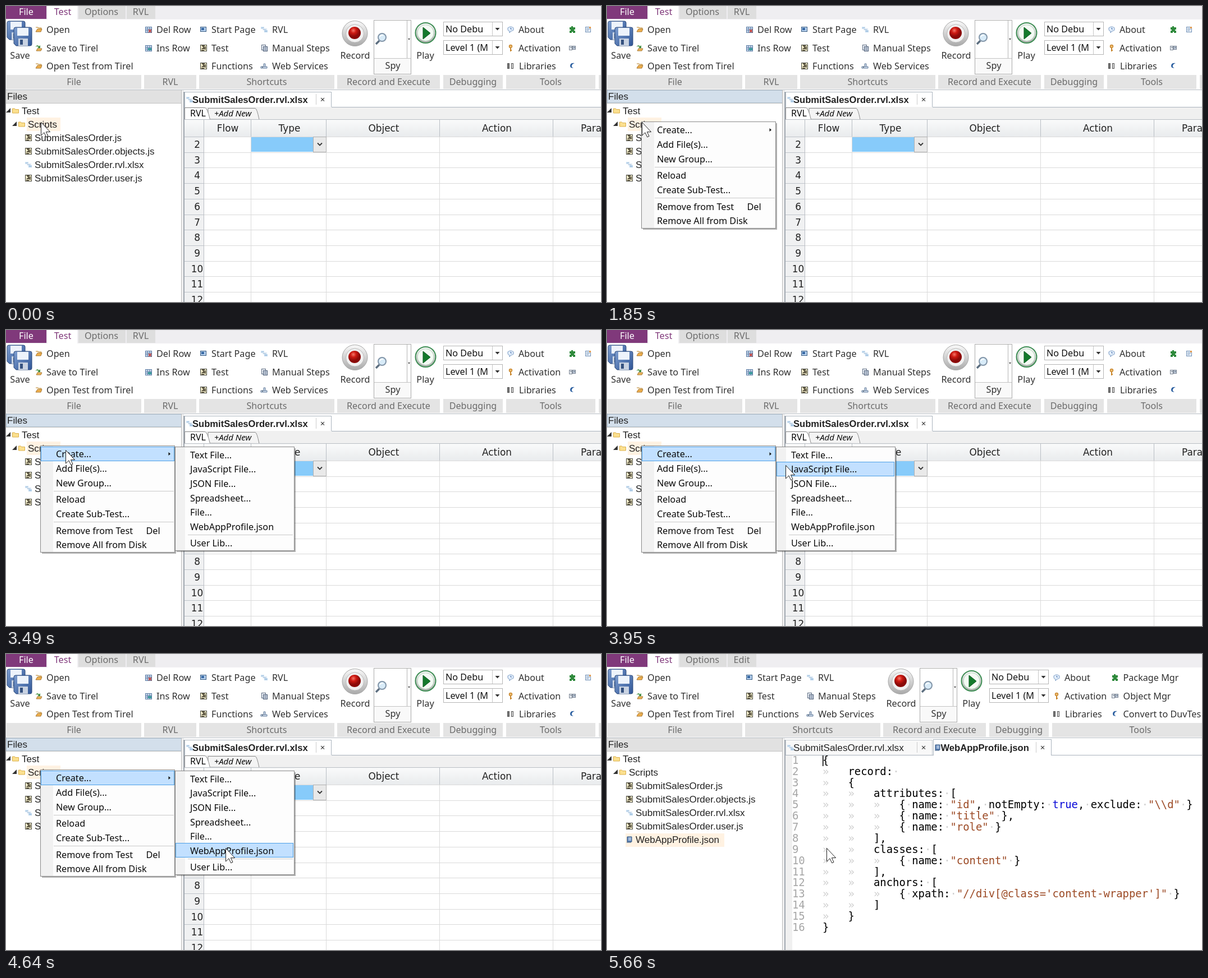
An HTML page that plays this animation: 1060x528 px, repeating every 7.66 s.

```html
<!DOCTYPE html>
<html lang="en">
<head>
<meta charset="utf-8">
<title>Creating a profile file</title>
<style>
html, body { margin: 0; width: 100%; height: 100%; overflow: hidden; background: #fff; }
svg { display: block; width: 100%; height: 100%; }
text { white-space: pre; }
.ui { font: 16.2px "Noto Sans", "Open Sans", sans-serif; fill: #303030; }
.menu { font: 16.2px "Noto Sans", "Open Sans", sans-serif; fill: #0a0a0a; }
.label { font: 16.1px "Noto Sans", "Open Sans", sans-serif; fill: #6b6b6b; }
.tree { font: 17px "Liberation Sans", Arial, sans-serif; fill: #222; }
.tab { font: 17.2px "Liberation Sans", Arial, sans-serif; fill: #222; }
.bold { font: bold 16.6px "Liberation Sans", Arial, sans-serif; fill: #222; }
.grid { font: 16.9px "DejaVu Sans", Verdana, sans-serif; fill: #222; }
.add { font: italic 15px "Open Sans", sans-serif; fill: #000; }
.code { font: 18.9px "DejaVu Sans Mono", monospace; fill: #000; }
.num { fill: #a6a6a6; }
.mark { fill: #cfcfcf; }
.str { fill: #9c4a25; }
.key { fill: #0a0ad8; }
.mid { text-anchor: middle; }
</style>
</head>
<body>
<svg id="stage" viewBox="0 0 1060 528" xmlns="http://www.w3.org/2000/svg"></svg>
<script>
const rect = (x, y, w, h, fill, stroke) => stroke
  ? `<rect x="${x + .5}" y="${y + .5}" width="${w - 1}" height="${h - 1}" fill="${fill}" stroke="${stroke}"/>`
  : `<rect x="${x}" y="${y}" width="${w}" height="${h}" fill="${fill}"/>`;
const path = (d, fill, stroke = 'none', width = 1) =>
  `<path d="${d}" fill="${fill}" stroke="${stroke}" stroke-width="${width}"/>`;
const circle = (x, y, r, fill, stroke = 'none', width = 1) =>
  `<circle cx="${x}" cy="${y}" r="${r}" fill="${fill}" stroke="${stroke}" stroke-width="${width}"/>`;
// y is the vertical middle of the capitals
const text = (x, y, s, cls = 'ui', style = '') =>
  `<text x="${x}" y="${y + 6}" class="${cls}" style="${style}">${s}</text>`;
const group = (id, body) => `<g id="${id}">${body}</g>`;
const shift = (dx, body) => `<g transform="translate(${dx})">${body}</g>`;
const at = (x, y, body) => `<g transform="translate(${x} ${y})">${body}</g>`;

// Small icons, centred on their own origin
const icon = {
  folder: path('M-5.500-4h4l1 1.500h6v6.500h-11z', '#fbe08f', '#dcb04c'),
  open: path('M-5-4h4l1 1h5v3', '#f6d58c', '#b98a45') + path('M-5 4l3-5h8l-2 5z', '#f0b04c', '#a87835'),
  saveTo: path('M-4 5l2-4h8l-2 4z', '#edb65a', '#a87835') + path('M-6-2q4-5 7-1l2-2v5h-5l2-2q-3-2-6 0z', '#3c8a3c'),
  js: rect(-6, -6, 12, 12, '#f2eccb', '#4a4a42') + path('M2-4h-4l3 3-3 2h4M-4 4h5M3-3v6', 'none', '#3b3525', 1.5),
  sheet: rect(-6, -5, 6, 4, '#cfe2f3') + rect(-3, -2, 8, 3, '#dfeaf5') + rect(0, 1, 6, 4, '#bdd7ee')
    + path('M-5-3h4M1 3h4M-2 0h5', 'none', '#9dbbd8'),
  delRow: rect(-6, -5, 12, 11, '#dce8f7', '#53759f') + path('M-6-1h12M-6 2h12M-2-5v11M2-5v11', 'none', '#53759f') + path('M0 0l5 5M5 0l-5 5', 'none', '#d03b30', 1.6),
  insRow: rect(-6, -5, 12, 11, '#dce8f7', '#53759f') + path('M-6-1h12M-6 2h12M-2-5v11M2-5v11', 'none', '#53759f') + rect(-1, 0, 6, 4, '#3a9b9b'),
  page: rect(-6, -5, 11, 9, '#b8d2ef', '#34587f') + rect(-4, -3, 5, 4, '#3768a4'),
  steps: rect(-5, -6, 8, 10, '#eef2f8', '#5b6a80') + rect(-2, -3, 8, 9, '#d5deeb', '#42536d') + path('M0 0h4M0 3h4', 'none', '#42536d'),
  web: path('M-6 4h11v-3h-11zM-1 1v-5h3v5', '#cfdcec', '#637a99') + circle(-3, 2, 1, '#456'),
  help: path('M-5-3q5-4 10 0v4q-3 2-5 2l-2 3v-3q-3-1-3-3z', '#e4effc', '#7b9cc4') + path('M-1-2h2v2', 'none', '#3b67a5'),
  key: circle(0, -3, 2.5, '#f3c276', '#c98932', 1.5) + path('M0 0v6M0 4h2', 'none', '#c98932', 2),
  books: rect(-6, -5, 4, 10, '#777', '#555') + rect(1, -5, 4, 10, '#ddd', '#555'),
  puzzle: path('M-5-4h3v-2h3v2h4v4h-2v2h2v4h-4v-2h-2v2h-4v-4h2v-2h-2z', '#2f8a3c'),
  cards: rect(-6, -4, 6, 8, '#e5e9ef', '#7d8795') + rect(0, -4, 6, 7, '#bdc8d8', '#7d8795') + path('M-4-1h3M2-1h3', 'none', '#567'),
  moon: path('M4-5q-8-1-8 5 1 5 6 3-4 0-3-4 1-3 5-4z', '#2b5fa0'),
  doc: rect(-5, -5, 10, 10, '#edf3fa', '#6f8fb5') + path('M-3-2h6M-3 0h6M-3 2h4', 'none', '#89a5c6') + rect(2, -5, 3, 3, '#e39a4c'),
  json: path('M-4-5h8v9h-8z', '#5d83b8', '#315480') + path('M-2-3h5M-2-1h5M-2 1h5', 'none', '#e9f1fb') + path('M-5 5h8', 'none', '#315480'),
};
const put = (name, x, y) => at(x, y, icon[name]);
const item = (name, x, y, tx, s, cls) => put(name, x, y) + text(tx, y, s, cls);
const down = (x, y) => path(`M${x - 4} ${y - 2}h8l-4 4.5z`, '#333');

const floppy = (x, y) => at(x, y,
  path('M0 3q0-3 3-3h26q3 0 3 3v27q0 3-3 3h-25l-4-4z', 'url(#blue)', '#2b4878')
  + rect(6, 1, 20, 14, '#edf3fb') + rect(8, 20, 17, 13, '#c9d3e2') + rect(11, 22, 5, 9, '#36527f'));

const bar = (x, w, s, mid = x + w / 2) => rect(x, 123, w, 25, '#e4e4e4') + text(mid, 135, s, 'label mid');
const combo = (y, s) => rect(779, y, 106, 26, '#fff', '#b5b5b5') + rect(866, y + 1, 1, 24, '#c6c6c6')
  + text(783, y + 12.5, s, 'ui', 'fill:#111') + down(875.5, y + 13);

const fileGroup = floppy(2, 27) + floppy(14, 38) + text(25, 88, 'Save', 'ui mid')
  + item('open', 58, 42, 72, 'Open') + item('saveTo', 58, 75, 72, 'Save to Tirel')
  + item('open', 58, 107, 72, 'Open Test from Tirel') + bar(1, 240, 'File');

const rowGroup = item('delRow', 254, 42, 268, 'Del Row') + item('insRow', 254, 75, 268, 'Ins Row') + bar(246, 93, 'RVL');

const magnifier = path('M665 62l-6 6', 'none', '#5d6f80', 3.5) + circle(670, 56, 7, '#d8ebf8', '#8295a8', 2)
  + path('M666 55q2-4 6-3', 'none', '#fff', 1.5);

const mainGroups = item('page', 352, 42, 366, 'Start Page') + item('js', 352, 75, 366, 'Test')
  + item('js', 352, 107, 366, 'Functions') + item('sheet', 460, 42, 474, 'RVL')
  + item('steps', 460, 75, 474, 'Manual Steps') + item('web', 460, 107, 474, 'Web Services')
  + bar(344, 241, 'Shortcuts')
  + circle(621.5, 49, 22.5, 'url(#ring)', '#a6a6a6') + circle(621.5, 49, 16, '#f1f1f1', '#bbb')
  + circle(621, 48, 11, 'url(#red)') + text(622, 88, 'Record', 'ui mid')
  + rect(655, 25, 67, 97, '#fff', '#ababab') + rect(656, 93, 65, 28, '#f9f9f9') + rect(656, 93, 65, 1, '#c4c4c4')
  + rect(714, 26, 1, 67, '#b5b5b5') + path('M716 58h4l-2 2.500z', '#333') + magnifier + text(689, 106, 'Spy', 'ui mid')
  + circle(747.5, 48, 18, 'url(#ring)', '#3f8f55', 2) + circle(747.5, 48, 14.5, '#f4faf4', '#b9d5bf')
  + path('M743 38v21l13-10.500z', '#147a2c', '#0c5b1e') + text(747, 88, 'Play', 'ui mid')
  + bar(590, 183, 'Record and Execute')
  + combo(28, 'No Debu') + combo(61, 'Level 1 (M') + bar(779, 106, 'Debugging')
  + item('help', 899, 42, 913, 'About') + item('key', 899, 75, 913, 'Activation') + item('books', 899, 107, 914, 'Libraries');

const toolIcons = put('puzzle', 1009, 42) + put('cards', 1009, 75) + put('moon', 1009, 107);

const topTabs = rect(0, 0, 1060, 24, '#efeef1') + rect(0, 0, 72, 23, '#80397b') + rect(74, 0, 53, 24, '#fff')
  + rect(129, 0, 84, 23, '#dedede') + rect(215, 0, 51, 23, '#dedede')
  + text(36, 10, 'File', 'ui mid', 'fill:#fff') + text(101, 10, 'Test', 'ui mid', 'fill:#80397b')
  + text(170, 10, 'Options', 'ui mid', 'fill:#6c6c6c');

const files = ['js', 'objects.js', 'rvl.xlsx', 'user.js'];
const tree = path('M0 190h8v-8z', '#333') + item('folder', 17, 187, 28, 'Test', 'tree')
  + path('M11 214h8v-8z', '#333') + item('folder', 28, 211, 39, 'Scripts', 'tree')
  + files.map((f, i) => item(f === 'rvl.xlsx' ? 'sheet' : 'js', 40, 235 + 24 * i, 51, 'SubmitSalesOrder.' + f, 'tree')).join('');

const close = x => text(x, 166, '×', 'ui mid', 'font-size:15px');
const ROW = 27.7, columns = [353, 437, 571, 773, 975];
let sheetView = rect(318, 153, 262, 29, '#fff', '#a9b3bd') + rect(319, 180, 741, 23, '#f0f0f0')
  + rect(580, 180, 480, 1, '#a9b3bd') + put('sheet', 327, 167) + text(332, 167, 'SubmitSalesOrder.rvl.xlsx', 'bold')
  + rect(552, 157, 1, 19, '#ccc') + close(564)
  + path('M360 202V182.500h84q3 0 7 20z', '#f4f4f4', '#8c8c8c') + path('M318.500 203V181.500h36q4 0 9 21z', '#fff', '#8c8c8c')
  + text(328, 191, 'RVL', 'menu', 'font-size:16px') + text(371, 191, '+Add New', 'add')
  + rect(318, 202, 742, 31, 'url(#head)') + rect(318, 202, 742, 1, '#b9bec4') + rect(318, 233, 35, 295, '#f0f1f2');
for (let i = 0; i < 11; i++) {
  const y = Math.round(233 + i * ROW);
  sheetView += rect(318, y, 742, 1, '#dadada') + rect(318, y, 35, 1, '#bfc4ca')
    + text(340.5, y + 13.5, i + 2, 'grid mid');
}
sheetView += columns.map((x, i) => rect(x - 1, 203, 1, 325, i ? '#dadada' : '#b9bec4') + rect(x - 1, 203, 1, 30, '#b9bec4')).join('')
  + [[395, 'Flow'], [505, 'Type'], [673, 'Object'], [874.5, 'Action']].map(([x, s]) => text(x, 217.5, s, 'grid mid')).join('')
  + text(1024, 217.5, 'Params', 'grid') + rect(437, 234, 111, 26, '#87cbfa')
  + rect(547, 233, 24, 28, '#e9e9e9', '#b0b0b0') + path('M555 244.500l4 4 4-4', 'none', '#333', 1.8);

const source = [[0, '{'], [1, 'record: '], [1, '{'], [2, 'attributes: ['],
  [3, String.raw`{ name: "id", notEmpty: true, exclude: "\\d" }`], [3, '{ name: "title" },'], [3, '{ name: "role" }'],
  [2, '],'], [2, 'classes: ['], [3, '{ name: "content" }'], [2, '],'], [2, 'anchors: ['],
  [3, `{ xpath: "//div[@class='content-wrapper']" }`], [2, ']'], [1, '}'], [0, '}']];
const span = (cls, s) => `<tspan class="${cls}">${s}</tspan>`;
const paint = s => s.replace(/"[^"]*"|true| /g, m =>
  m === ' ' ? span('mark', '·') : span(m === 'true' ? 'key' : 'str', m));
const editorView = rect(318, 153, 262, 28, '#f8f8f8', '#c3c9cf') + put('sheet', 327, 167)
  + text(332, 167, 'SubmitSalesOrder.rvl.xlsx', 'tab') + rect(552, 157, 1, 19, '#ccc') + close(564)
  + rect(318, 180, 742, 1, '#a9b3bd') + rect(581, 152, 211, 29, '#fff', '#a9b3bd') + rect(582, 180, 209, 1, '#fff')
  + put('json', 589, 167) + text(594.5, 167, 'WebAppProfile.json', 'bold') + rect(764, 157, 1, 19, '#ccc') + close(776)
  + rect(318, 181, 12, 347, '#f0f0f0')
  + source.map(([depth, s], i) => {
    const y = 189.8 + 19.87 * i;
    return text(330, y, i + 1, 'code num') + text(384, y, span('mark', '»   ').repeat(depth) + paint(s), 'code');
  }).join('') + rect(384, 181, 1.5, 19, '#000');

const popup = (x, y, w, h, gutter) => rect(x + 3, y + 3, w - 1, h - 1, 'rgba(0,0,0,.3)') + rect(x, y, w, h, '#fdfdfd', '#8a8a8a')
  + rect(x + 1, y + 1, gutter, h - 2, '#f1f1f1');
const glow = (id, x, y, w) => `<g id="${id}">${rect(x, y, w, 26, '#c2e0ff', '#4b9fe6')}</g>`;
const menuRows = [[221, 'Create...'], [247, 'Add File(s)...'], [272.5, 'New Group...'], [302, 'Reload'],
  [328, 'Create Sub-Test...'], [357.5, 'Remove from Test'], [383, 'Remove All from Disk']];
const subRows = [[222.5, 'Text File...'], [248, 'JavaScript File...'], [273.5, 'JSON File...'], [299.5, 'Spreadsheet...'],
  [325, 'File...'], [350.5, 'WebAppProfile.json'], [380, 'User Lib...']];
const rows = (list, x) => list.map(([y, s]) => text(x, y, s, 'menu')).join('');

document.getElementById('stage').innerHTML = `<defs>
  <linearGradient id="blue" x2="1" y2="1"><stop stop-color="#7f9fd0"/><stop offset="1" stop-color="#2f5596"/></linearGradient>
  <linearGradient id="ring" x2="0" y2="1"><stop stop-color="#fafafa"/><stop offset="1" stop-color="#a9a9a9"/></linearGradient>
  <linearGradient id="head" x2="0" y2="1"><stop stop-color="#fafbfb"/><stop offset="1" stop-color="#e9ebed"/></linearGradient>
  <radialGradient id="red" cx=".4" cy=".3"><stop stop-color="#f4796a"/><stop offset=".45" stop-color="#cf1a12"/><stop offset="1" stop-color="#8a0a08"/></radialGradient>
</defs>`
  + rect(0, 0, 1060, 528, '#fff') + topTabs + fileGroup
  + group('before', text(240, 10, 'RVL', 'ui mid', 'fill:#6c6c6c') + rowGroup + mainGroups + toolIcons
    + put('doc', 1037, 42) + bar(891, 159, 'Tools') + rect(1056, 123, 4, 25, '#e4e4e4'))
  + group('after', text(240, 10, 'Edit', 'ui mid', 'fill:#6c6c6c') + shift(-98, mainGroups) + shift(-104, toolIcons)
    + text(919.5, 42, 'Package Mgr') + text(919.5, 75, 'Object Mgr') + text(919.5, 107, 'Convert to DuvTes')
    + bar(793, 267, 'Tools', 950))
  + rect(0, 149, 1060, 1, '#b4bac1') + rect(0, 150, 313, 23, '#e1e1e1') + group('focus', rect(0, 150, 313, 23, '#d3dfeb', '#b4c4d3'))
  + rect(0, 173, 313, 1, '#c4c4c4') + text(2, 161, 'Files', 'tree')
  + group('hover', rect(37, 199, 60, 24, '#fff2e2'))
  + group('added', rect(33, 320, 176, 24, '#fff2e2') + item('json', 40, 331, 51, 'WebAppProfile.json', 'tree'))
  + tree + rect(312, 150, 1, 378, '#bcbcbc') + rect(313, 150, 4, 378, '#f0f0f0') + rect(316, 153, 2, 375, '#a2a9b1')
  + group('sheet', sheetView) + group('editor', editorView)
  + group('menu', popup(61, 206, 240, 191, 22) + rect(85, 287, 214, 1, '#c8c8c8') + rect(85, 342, 214, 1, '#c8c8c8')
    + glow('create', 62, 208, 238) + rows(menuRows, 89) + text(249.5, 357.5, 'Del', 'menu') + path('M289.500 218l3.500 3-3.500 3z', '#111'))
  + group('submenu', popup(301, 208, 213, 186, 17) + rect(324, 365, 187, 1, '#c8c8c8') + glow('pick', 302, 0, 210) + rows(subRows, 328))
  + group('cursor', path('M.5 .5v23.500l5.500-5.200 3.700 8 3.300-1.500-3.600-7.700h7.200z', '#fff', '#222'));

const el = id => document.getElementById(id);
const show = (id, on) => el(id).style.display = on ? '' : 'none';
const LOOP = 7660;
// Each entry holds the pointer at x, y from the given time on
const moves = [[0, 62, 207], [2400, 66, 207], [2470, 75, 207], [2550, 84.5, 207], [2630, 92, 208], [2710, 97, 209],
  [2940, 100, 211], [3020, 103, 213], [3090, 106, 214], [3560, 122, 216], [3640, 158, 219], [3720, 205, 222],
  [3790, 251, 226], [3870, 290, 231], [3950, 318, 241], [4020, 336, 256], [4100, 350, 272], [4180, 360.5, 286],
  [4250, 367, 294], [4330, 373, 304], [4410, 380, 317], [4480, 385, 329], [4560, 389, 340], [4640, 391, 346]];

function draw(t) {
  const [, x, y] = moves.findLast(m => m[0] <= t);
  const opened = t >= 5660, menus = t < 5570;
  el('cursor').setAttribute('transform', `translate(${x} ${y})`);
  show('focus', t >= 770 && !opened);
  for (const id of ['before', 'sheet', 'hover']) show(id, !opened);
  for (const id of ['after', 'editor', 'added']) show(id, opened);
  show('menu', t >= 1850 && menus);
  show('create', t >= 2630);
  show('submenu', t >= 3490 && menus);
  const row = x > 302 && subRows.find(r => Math.abs(r[0] - y) <= 13);
  show('pick', row);
  if (row) el('pick').setAttribute('transform', `translate(0 ${Math.floor(row[0] - 13)})`);
}

const start = performance.now();
function tick() {
  draw((performance.now() - start) % LOOP);
  requestAnimationFrame(tick);
}
tick();
</script>
</body>
</html>
```
